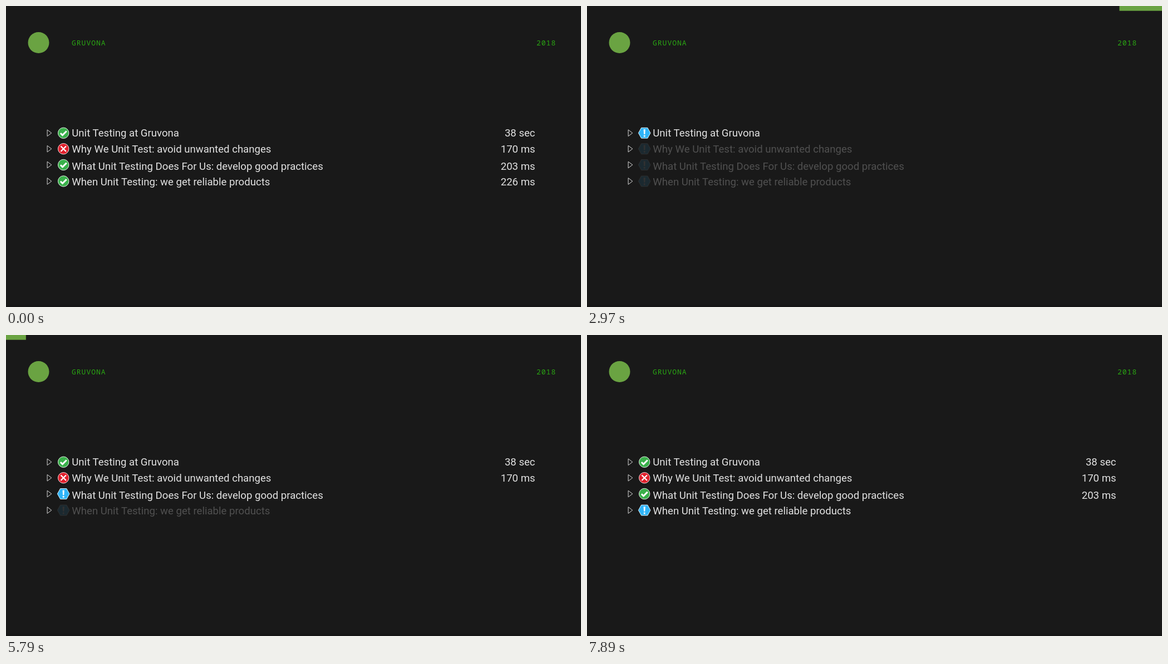
Animation, 1033 px wide and 542 px high, one loop 8 s. Source, as an HTML page:

```html
<!DOCTYPE html>
<html lang="en">
<head>
<meta charset="utf-8">
<title>Unit testing run</title>
<style>
  html, body { margin: 0; width: 100%; height: 100%; overflow: hidden; background: #191919; }
  svg { display: block; width: 100%; height: 100%; }
  .label { font: 400 18.6px Roboto, Arial, sans-serif; fill: #e2e2e2; }
  .time { text-anchor: end; }
  .head { font: 500 13px "Roboto Mono", "Noto Sans Mono", monospace; letter-spacing: 1px; fill: #2aa513; }
  .dim .label { opacity: .27; }
  .dim .mark { opacity: .1; }
</style>
</head>
<body>
<svg viewBox="0 0 1033 542">
  <defs>
    <g id="pass">
      <circle r="9.7" fill="#39b04a" stroke="#e6f3e8"/>
      <path d="M-5.3 .3L-1.7 3.9L5.6 -3.4" fill="none" stroke="#fff" stroke-width="2.9"/>
    </g>
    <g id="fail">
      <circle r="9.7" fill="#e11f2b" stroke="#f8e2e3"/>
      <path d="M-4.8 -4.8L4.8 4.8M4.8 -4.8L-4.8 4.8" fill="none" stroke="#fff" stroke-width="2.2"/>
    </g>
    <g id="wait">
      <path d="M-10.8 0L-5.6 -9.4H5.6L10.8 0L5.6 9.4H-5.6Z" fill="#2fb4f8" stroke="#e4f5fe"/>
      <path d="M-1.6 -6.6H1.6L1.1 2.2H-1.1Z" fill="#fff"/>
      <circle cy="5.3" r="1.6" fill="#fff"/>
    </g>
  </defs>
  <rect width="1033" height="542" fill="#191919"/>
  <rect y="538" width="1033" height="4" fill="#161616"/>
  <circle cx="58.5" cy="66" r="19" fill="#6aa342"/>
  <text class="head" x="118" y="71.3">GRUVONA</text>
  <text class="head" x="953" y="71.3">2018</text>
  <g id="rows"></g>
  <rect id="bar" y="0" width="155" height="8.7" fill="#6aa342"/>
</svg>
<script>
const LOOP = 8000, STEP = 30, OFF_LEFT = -155, OFF_RIGHT = 1033;

// start: when the row becomes active; it is finished when the next one starts
const rows = [
  { text: "Unit Testing at Gruvona", time: "38 sec", icon: "pass", y: 228.7, base: 235.4, start: 900 },
  { text: "Why We Unit Test: avoid unwanted changes", time: "170 ms", icon: "fail", y: 257.2, base: 264.3, start: 3060 },
  { text: "What Unit Testing Does For Us: develop good practices", time: "203 ms", icon: "pass", y: 286, base: 294.9, start: 5190 },
  { text: "When Unit Testing: we get reliable products", time: "226 ms", icon: "pass", y: 315.5, base: 322.7, start: 7350 }
];

// [time, left edge] points of each sweep of the progress bar
const sweeps = [
  [[890, OFF_LEFT], [1590, 617.5], [1680, 796], [1799, OFF_RIGHT]],
  [[2102, OFF_LEFT], [2970, 956.5], [3030, OFF_RIGHT]],
  [[3165, OFF_LEFT], [3720, 442], [3990, 756.7], [4230, OFF_RIGHT]],
  [[4533, OFF_LEFT], [4920, 341.3], [5340, 879], [5460, OFF_RIGHT]],
  [[5762, OFF_LEFT], [6450, 726], [6570, 879], [6690, OFF_RIGHT]],
  [[6962, OFF_LEFT], [7770, 896], [7877, OFF_RIGHT]]
];

const speedUp = u => .2 * u + .8 * u * u;
const bar = document.getElementById("bar");
const list = document.getElementById("rows");

function add(parent, tag, attrs, text = "") {
  const el = document.createElementNS("http://www.w3.org/2000/svg", tag);
  for (const key in attrs) el.setAttribute(key, attrs[key]);
  el.textContent = text;
  parent.append(el);
  return el;
}

for (const row of rows) {
  row.group = add(list, "g", {});
  add(row.group, "path", {
    d: `M74.1 ${row.y - 5.8}L81.8 ${row.y}L74.1 ${row.y + 5.8}Z`,
    fill: "none", stroke: "#d8d8d8"
  });
  row.mark = add(row.group, "use", { class: "mark", x: 103.2, y: row.y });
  add(row.group, "text", { class: "label", x: 118.3, y: row.base }, row.text);
  row.timer = add(row.group, "text", { class: "label time", x: 950.6, y: row.base }, row.time);
}

function barLeft(t) {
  const sweep = sweeps.find(s => t >= s[0][0] && t < s[s.length - 1][0]);
  if (!sweep) return OFF_RIGHT;
  const i = sweep.findIndex(p => t < p[0]);
  const [t0, x0] = sweep[i - 1], [t1, x1] = sweep[i];
  const u = (t - t0) / (t1 - t0);
  const eased = sweep === sweeps[0] && i === 1 ? speedUp(u) : u;
  return x0 + (x1 - x0) * eased;
}

function draw(t) {
  bar.setAttribute("x", barLeft(t));
  rows.forEach((row, i) => {
    const end = i < rows.length - 1 ? rows[i + 1].start : LOOP;
    const done = t < rows[0].start || t >= end;
    row.group.setAttribute("class", !done && t < row.start ? "dim" : "");
    row.mark.setAttribute("href", done ? "#" + row.icon : "#wait");
    row.timer.setAttribute("visibility", done ? "visible" : "hidden");
  });
}

const begin = performance.now();
function tick() {
  const t = (performance.now() - begin) % LOOP;
  draw(Math.floor(t / STEP) * STEP);
  requestAnimationFrame(tick);
}
tick();
</script>
</body>
</html>
```
